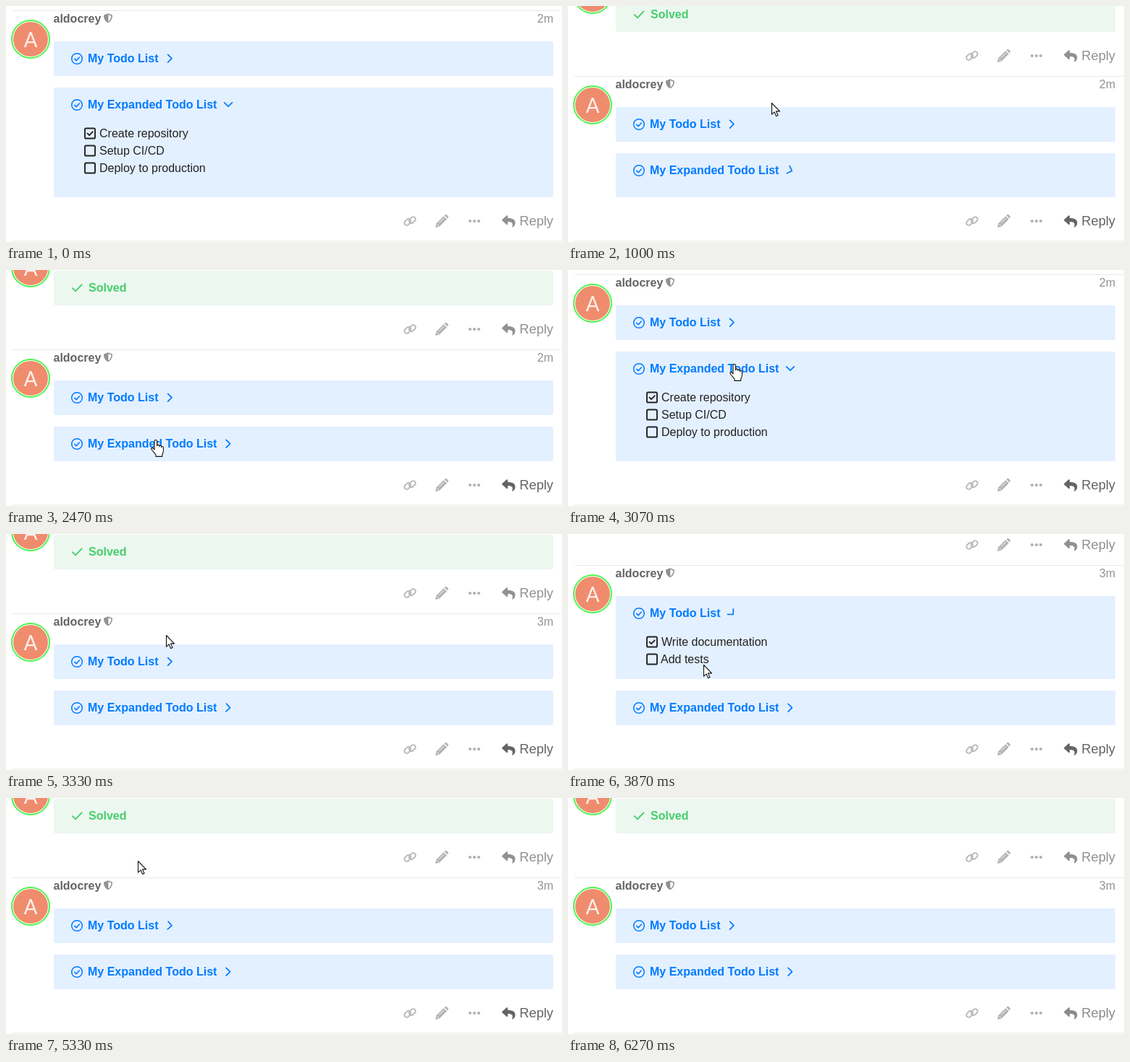
These frames come from a looping animation (768x327 px, 6.54 s). An HTML page:

```html
<!DOCTYPE html>
<html lang="en">
<head>
<meta charset="utf-8">
<title>Todo list</title>
<style>
  html, body { margin: 0; width: 100%; height: 100%; overflow: hidden; background: #fff; }
  svg { display: block; }
  text { font: 16px "Liberation Sans", Arial, sans-serif; fill: #222; }
  .bold { font-weight: bold; }
  .letter { font: 30px Roboto, sans-serif; fill: #fdeee9; text-anchor: middle; }
  .line { fill: none; stroke-linecap: round; stroke-linejoin: round; }
</style>
</head>
<body>
<svg id="stage" width="768" height="327" viewBox="0 0 768 327"></svg>
<script>
const LOOP = 6540, TICK = 200 / 3;
const BLUE = '#007bff', GREEN = '#46ce6b', DARK = '#646464', GREY = '#919191';
const CLOSED = 48, LIST = 104;

const text = (x, y, s, attrs = '') => `<text x="${x}" y="${y}" ${attrs}>${s}</text>`;
const stroke = (d, color, width) =>
  `<path class="line" d="${d}" stroke="${color}" stroke-width="${width}"/>`;
const rule = y => `<rect x="9" y="${y}" width="758" height="1" fill="#e9e9e9"/>`;

const avatar = y => `<g transform="translate(34 ${y})">
  <circle r="26" fill="#fff" stroke="#4df54d" stroke-width="2"/>
  <circle r="24" fill="#f08c6e"/>${text(0, 10.7, 'A', 'class="letter"')}</g>`;

const shield = `<g transform="translate(135 114)">
  <path d="M6 .2 11.6 2.5Q12 2.8 12 3.5C11.8 8 9.5 11.6 6 13.3 2.5 11.6.2 8 0 3.5Q0 2.8.4 2.5Z" fill="${GREY}"/>
  <path d="M6.3 2 10.4 3.7C10.2 7.4 8.8 10 6.3 11.6Z" fill="#fff"/></g>`;

const loop = (x, y) =>
  `<rect x="-5" y="-3.3" width="10" height="6.6" rx="3.3" transform="translate(${x} ${y}) rotate(-45)"/>`;

const footer = (y, id = '') => `<g transform="translate(0 ${y})">
  <g transform="translate(558 0)" fill="none" stroke="#b9b9b9" stroke-width="1.9">
    ${loop(-3.2, 1.4)}${loop(3.2, -1.4)}</g>
  <g transform="translate(602 0)" fill="#b4b4b4">
    <path d="M-9 9-7.6 3.2 2.4-6.8 6.8-2.4-3.2 7.6Z"/>
    <path d="M3.5-7.8 4.9-9Q6-9.6 7-8.6L8.6-7Q9.5-6 8.8-5L7.8-3.6Z"/>
    ${stroke('M-3.6 2.4 2.4-3.6M-6 4.6-4.4 6.2', '#fff', 1)}</g>
  <g fill="#b0b0b0">${[641, 647, 653].map(x => `<circle cx="${x}" cy="0" r="2.1"/>`).join('')}</g>
  <g ${id} fill="${GREY}">
    <path transform="translate(685 -8.3)" d="M.2 6.2 6.6.6Q8 0 8 1.6V4.4C14 4.5 18.4 5.7 18.4 11 18.4 13.6 16.8 15.6 15 16.7 14.2 17 14 16.6 14.2 16 15.9 10.9 13.5 9.4 8 9.3V12.4Q8 14 6.6 13.2L.2 7.6Q-.4 6.9.2 6.2Z"/>
    ${text(709.3, 6, 'Reply', 'style="font-size:18.28px;fill:inherit"')}</g></g>`;

const item = (label, i) => {
  const y = 27 + i * 24;
  return `<rect x="109" y="${y - 6.5}" width="14" height="14" rx="1.6" fill="none" stroke="#222" stroke-width="1.9"/>
    ${i ? '' : stroke(`M112.6 ${y + .6}l2.5 2.5 4.6-4.8`, '#222', 1.9)}
    ${text(label[0] === 'A' ? 128 : 129, y + 6, label)}`;
};

const box = (id, title, chevronX, items) => `<g id="${id}">
  <rect class="panel" x="66" width="690" height="48" rx="2" fill="#e3f0ff"/>
  <circle cx="98" cy="24" r="7.3" fill="none" stroke="${BLUE}" stroke-width="1.5"/>
  ${stroke('M94.8 24.4l2.3 2.3 4.2-4.7', BLUE, 1.6)}
  ${text(113, 29, title, `class="bold" style="fill:${BLUE}"`)}
  <g class="chevron" data-x="${chevronX}">${stroke('M-2.9-5.4 2.5 0-2.9 5.4', BLUE, 1.7)}</g>
  <svg class="list" y="36" width="768" height="0" overflow="hidden">${items.map(item).join('')}</svg></g>`;

const stage = document.getElementById('stage');
stage.innerHTML = `<g id="above">
    ${avatar(-3)}
    <rect x="66" y="1" width="690" height="48" rx="2" fill="#ecf7f0"/>
    ${stroke('M91.8 25.2l4.2 4.2 8.6-9', GREEN, 1.9)}
    ${text(114, 30, 'Solved', `class="bold" style="fill:${GREEN}"`)}
    ${footer(82)}${rule(110)}${avatar(150)}
    ${text(65.5, 127, 'aldocrey', `class="bold" style="fill:${DARK}"`)}${shield}
    ${text(756, 127, '', `id="age" text-anchor="end" style="fill:${GREY}"`)}
  </g>
  ${box('first', 'My Todo List', 226.5, ['Write documentation', 'Add tests', 'Review code'])}
  ${box('second', 'My Expanded Todo List', 307, ['Create repository', 'Setup CI/CD', 'Deploy to production'])}
  ${footer(298, 'id="reply"')}${rule(325)}
  <g id="cursor" fill="#fff" stroke="#111" stroke-width="1.1" stroke-linejoin="round">
    <path id="arrow" d="M.5.5V16.2L4.1 12.8 6.6 18.6 9 17.5 6.5 11.9H11.5Z"/>
    <path id="hand" transform="translate(-6 0)" d="M5 14V2.3a1.8 1.8 0 0 1 3.6 0V8.5c0-1.9 3-1.9 3 0v1c0-1.9 3-1.7 3 .2v1c0-1.7 2.8-1.5 2.8.4V16c0 2-1.5 3.5-1.7 5.5V23.4H7V21C5.5 19 3 16.5 1.2 13.8 0 12 2 10.6 3.4 12Z"/>
  </g>`;
const $ = id => document.getElementById(id);

// Clicks as [ms, open]
const clicks = {
  first: [[-999, 0], [3792, 1], [5150, 0]],
  second: [[-999, 1], [883, 0], [2465, 1], [3150, 0]]
};

// Pointer keys as [tick, x, y, easing towards this key]
const smooth = p => p * p * (3 - 2 * p);
const easeOut = p => 1 - (1 - p) ** 2;
const easeIn = p => p * p;
const pointer = [
  [1, 565, 316], [10, 282, 136, easeOut], [11, 281, 134], [15, 281, 134],
  [23, 238, 231], [26, 237, 234], [27, 237, 234], [31, 226, 205], [35, 206, 235],
  [38, 206, 235], [46, 229, 130], [48, 229, 130], [55, 187, 181], [58, 187, 181],
  [67, 174, 67], [72, 174, 67], [75, 174, 74], [78, 174, 74], [87, 330, 345, easeIn]
];
const replyColors = [[0, GREY], [14, DARK], [85, '#767676'], [87, '#858585'], [91, '#888'], [94, '#8b8b8b']];

// CSS "ease" curve
function ease(x) {
  if (x <= 0) return 0;
  if (x >= 1) return 1;
  let lo = 0, hi = 1, s;
  for (let i = 0; i < 20; i++) {
    s = (lo + hi) / 2;
    if (.75 * s * (1 - s) + s ** 3 < x) lo = s; else hi = s;
  }
  return .3 * s * (1 - s) ** 2 + 3 * s * s * (1 - s) + s ** 3;
}

const latest = (table, at) => table.filter(row => row[0] <= at).pop();

function openness(id, ms, duration) {
  const [start, open] = latest(clicks[id], ms);
  const p = ease((ms - start) / duration);
  return open ? p : 1 - p;
}

function pointerAt(n) {
  const i = pointer.findIndex(k => k[0] >= n);
  if (n < 1 || i < 0) return null;
  if (i === 0) return [pointer[0][1], pointer[0][2]];
  const [n0, x0, y0] = pointer[i - 1], [n1, x1, y1, curve = smooth] = pointer[i];
  const p = curve((n - n0) / (n1 - n0));
  return [Math.round(x0 + (x1 - x0) * p), Math.round(y0 + (y1 - y0) * p)];
}

function placeBox(id, y, extra, ms) {
  const el = $(id), chevron = el.querySelector('.chevron');
  el.setAttribute('transform', `translate(0 ${y})`);
  el.querySelector('.panel').setAttribute('height', CLOSED + extra);
  el.querySelector('.list').setAttribute('height', extra);
  chevron.setAttribute('transform',
    `translate(${chevron.dataset.x} 23.7) rotate(${90 * openness(id, ms, 250)})`);
}

function draw(time) {
  const n = Math.floor((time + 4) / TICK), ms = n * TICK;
  const extra1 = Math.round(LIST * openness('first', ms, 200));
  const extra2 = Math.round(LIST * openness('second', ms, 200));
  const y1 = 153 - extra1 - extra2, y2 = 217 - extra2;

  $('above').setAttribute('transform', `translate(0 ${-extra1 - extra2})`);
  placeBox('first', y1, extra1, ms);
  placeBox('second', y2, extra2, ms);
  $('age').textContent = n < 48 ? '2m' : '3m';
  $('reply').setAttribute('fill', latest(replyColors, n)[1]);

  const at = pointerAt(n);
  $('cursor').style.display = at ? '' : 'none';
  if (!at) return;
  const over = [y1, y2].some(y => at[1] >= y + 12 && at[1] <= y + 36);
  $('cursor').setAttribute('transform', `translate(${at})`);
  $('hand').style.display = over ? '' : 'none';
  $('arrow').style.display = over ? 'none' : '';
}

const begin = performance.now();
function tick() {
  draw((performance.now() - begin) % LOOP);
  requestAnimationFrame(tick);
}
tick();
</script>
</body>
</html>
```
